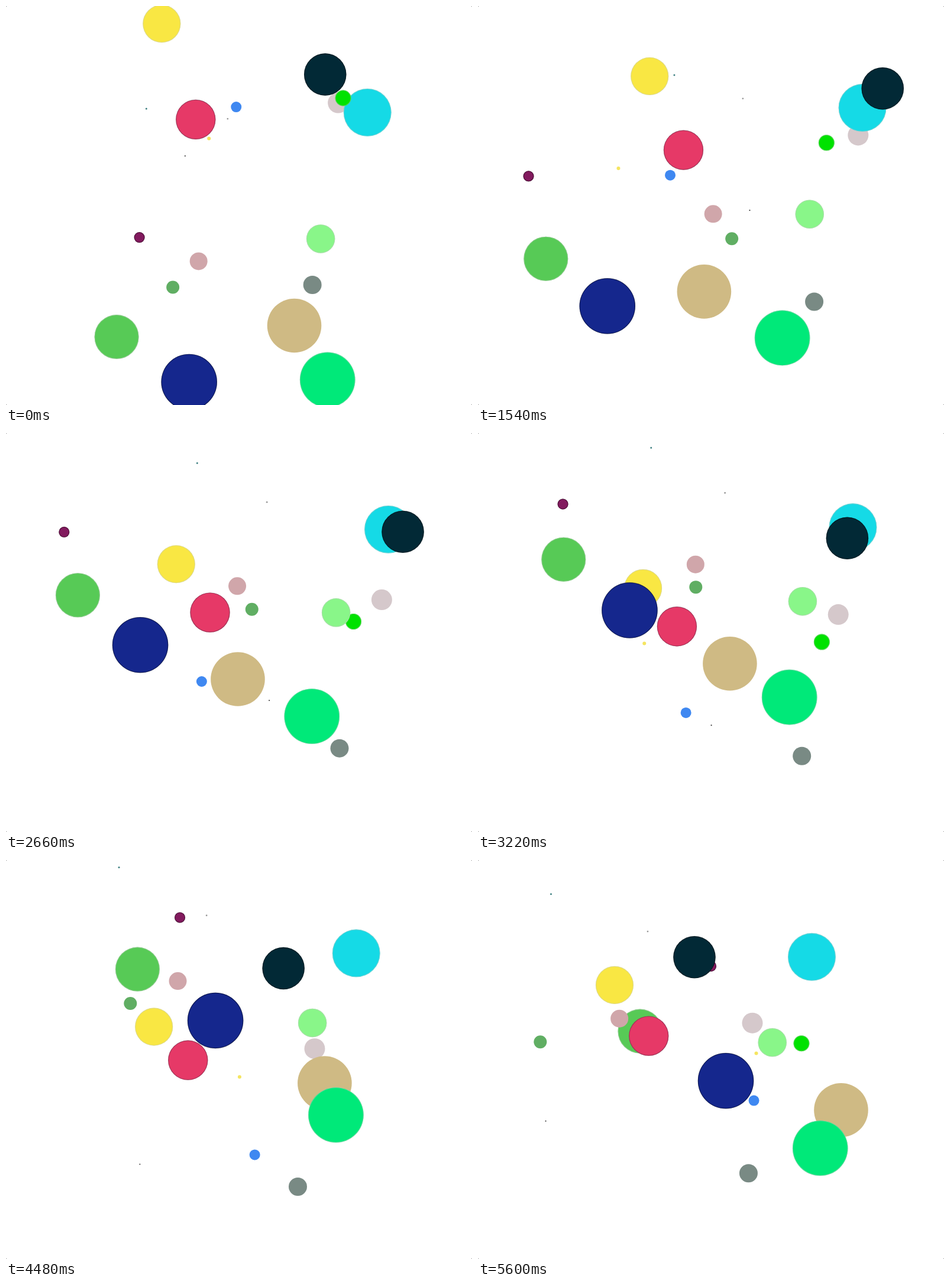
These frames come from a looping animation (788x676 px, 5.67 s). An HTML page with a canvas:

```html
<!DOCTYPE html>
<html lang="en">
<head>
<meta charset="utf-8">
<title>Orbiting balls</title>
<style>
  html, body { margin: 0; width: 100%; height: 100%; overflow: hidden; background: #777; }
  canvas { display: block; width: 788px; height: 676px; border-radius: 2px; }
</style>
</head>
<body>
<canvas id="stage" width="788" height="676"></canvas>
<script>
const ctx = document.getElementById('stage').getContext('2d');
const STEP = 70, STEPS = 81;

const DARK = 'rgba(0,0,0,.4)', SOFT = 'rgba(190,200,190,.45)';

// Back to front: centre x, centre y, x swing, y swing, radius, fill, rim
const balls = [
  [551.6, 243.6, 95.9, -80, 17.5, '#d5c8cb'],
  [242.9, 241.5, -165.5, 151.4, 9, '#821a5e', DARK],
  [397.2, 338.9, -75.9, -168.8, 9, '#3f88f1'],
  [511.9, 513.9, 59.6, -41.6, 15.5, '#798a84'],
  [356.3, 297.6, -125, -73.5, 3, '#f5e560'],
  [225.6, 91.4, 111.8, 83, 1.5, '#3d7f80'],
  [365.8, 141.4, 86.3, 49.9, 1.4, '#999999'],
  [283.5, 387.7, 185, -134.4, 1.1, '#444444'],
  [260, 159.1, 31.8, -129.8, 32, '#f9e743', SOFT],
  [196, 368.6, -85.4, 193, 37.5, '#57ca56', SOFT],
  [606.4, 168.9, 45.9, 11.5, 40.4, '#15dae6', SOFT],
  [521.9, 150.5, 170.7, -34.7, 35.7, '#022936', DARK],
  [567.7, 265.8, 22.7, -110.4, 13.5, '#00e200', SOFT],
  [528.6, 333.9, 33.8, 60.9, 24.2, '#89f689', SOFT],
  [500.5, 457.9, -124.2, 84, 45.8, '#cfba84'],
  [547.3, 530.4, -34.4, 103.5, 46.8, '#00e979', SOFT],
  [320.9, 450.4, -107.4, 187.6, 47.2, '#15278d', DARK],
  [317.5, 267.4, 31.5, -75.5, 33.6, '#e63967', 'rgba(60,40,60,.4)'],
  [264, 357.1, 173.7, 120, 11, '#60ae63'],
  [316.8, 316.2, 85, 116.9, 15, '#d0a6aa']
];

// Orbit angle in degrees by step; about 3 degrees each, with a slight lag midway
const angles = [[0, 6], [22, 72], [31, 98.1], [46, 143.1], [64, 198], [80, 246]];

function angleAt(step) {
  const i = angles.findIndex(([s]) => s >= step) || 1;
  const [s0, a0] = angles[i - 1], [s1, a1] = angles[i];
  return (a0 + (a1 - a0) * (step - s0) / (s1 - s0)) * Math.PI / 180;
}

function drawBall(x, y, r, fill, rim) {
  ctx.beginPath();
  ctx.arc(x, y, r, 0, Math.PI * 2);
  ctx.fillStyle = fill;
  ctx.fill();
  if (!rim) return;
  ctx.beginPath();
  ctx.arc(x, y, r - 0.5, 0, Math.PI * 2);
  ctx.strokeStyle = rim;
  ctx.lineWidth = 1.2;
  ctx.stroke();
}

function draw(now) {
  const a = angleAt(Math.floor(now / STEP) % STEPS);
  const sin = Math.sin(a), cos = Math.cos(a);
  ctx.fillStyle = '#fff';
  ctx.fillRect(0, 0, 788, 676);
  for (const [cx, cy, dx, dy, r, fill, rim] of balls) {
    drawBall(cx + dx * sin, cy + dy * cos, r, fill, rim);
  }
}

const start = performance.now();
function tick() {
  draw(performance.now() - start);
  requestAnimationFrame(tick);
}
tick();
</script>
</body>
</html>
```
